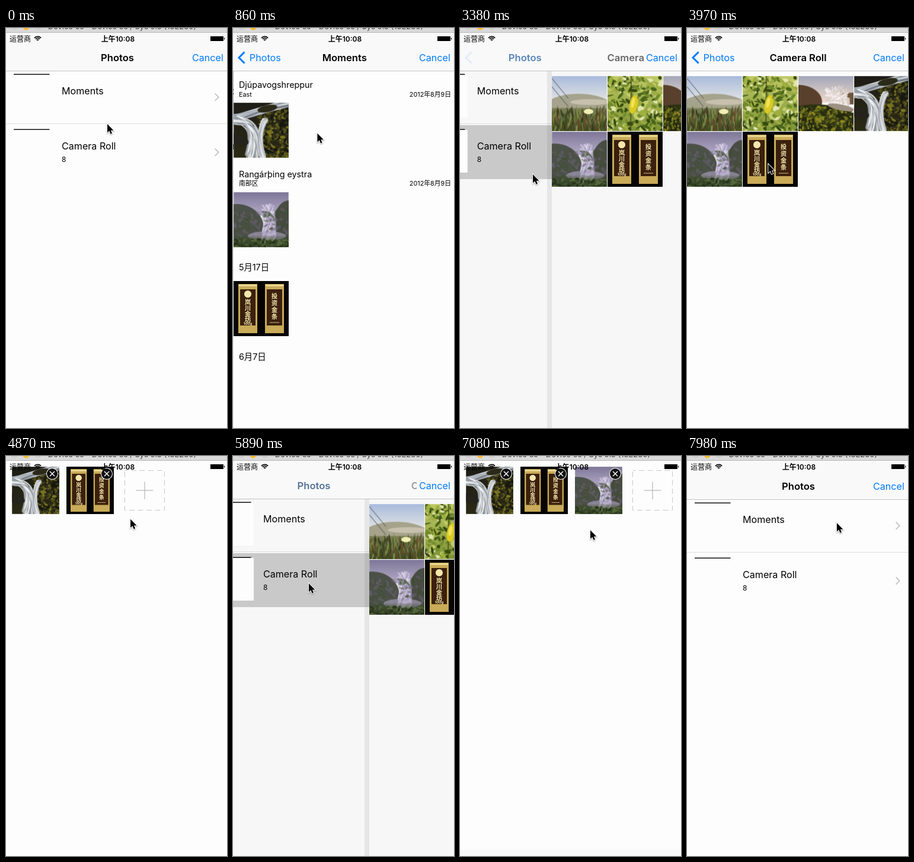
An HTML page with a canvas that plays this animation: 373 px wide and 675 px high, repeating every 8000 ms.

```html
<!DOCTYPE html>
<html lang="en">
<head>
<meta charset="utf-8">
<title>Photo picker</title>
<style>
  html, body { margin: 0; height: 100%; overflow: hidden; background: #fdfdfd; }
  canvas { display: block; width: 373px; height: 675px; }
</style>
</head>
<body>
<canvas id="stage"></canvas>
<script>
const W = 373, H = 675, LOOP = 8000, TOP = 8, TILE = 93;
const BLUE = '#007aff', PAGE = '#fdfdfd';
const FAMILY = 'Inter, "Noto Sans CJK SC", "Noto Sans CJK", sans-serif';

const stage = document.getElementById('stage');
const dpr = window.devicePixelRatio || 1;
stage.width = W * dpr;
stage.height = H * dpr;
const ctx = stage.getContext('2d');
ctx.scale(dpr, dpr);

// ---------- drawing helpers ----------
function rect(g, color, x, y, w, h) {
  g.fillStyle = color;
  g.fillRect(x, y, w, h);
}
function line(g, color, width, x1, y1, x2, y2) {
  g.strokeStyle = color;
  g.lineWidth = width;
  g.beginPath();
  g.moveTo(x1, y1);
  g.lineTo(x2, y2);
  g.stroke();
}
// Angle bracket with its tip at x, y; a negative size points left.
function chevron(color, width, x, y, size) {
  ctx.strokeStyle = color;
  ctx.lineWidth = width;
  ctx.beginPath();
  for (const side of [-1, 0, 1]) ctx.lineTo(x - Math.abs(side) * size, y + side * size);
  ctx.stroke();
}
function disc(g, color, x, y, rx, ry = rx, turn = 0) {
  g.fillStyle = color;
  g.beginPath();
  g.ellipse(x, y, rx, ry, turn, 0, 7);
  g.fill();
}
function text(g, str, x, y, size, { color = '#000', weight = 400, align = 'left' } = {}) {
  g.font = `${weight} ${size}px ${FAMILY}`;
  g.fillStyle = color;
  g.textAlign = align;
  g.fillText(str, x, y);
}
function fade(g, top, bottom, y = 0, h = TILE) {
  const shade = g.createLinearGradient(0, y, 0, y + h);
  shade.addColorStop(0, top);
  shade.addColorStop(1, bottom);
  rect(g, shade, 0, y, TILE, h);
}
function seeded(seed) {
  return () => (seed = (seed * 16807) % 2147483647) / 2147483647;
}
// Small turned specks strewn over the tile from y downwards, right of x.
function strew(g, count, x, y, colors, rx, ry, turn = 3) {
  const rnd = seeded(count);
  for (let i = 0; i < count; i++) {
    disc(g, colors[i % colors.length], x + rnd() * (TILE - x), y + rnd() * (TILE - y),
      rx * (0.5 + rnd()), ry * (0.5 + rnd()), (rnd() - 0.5) * turn);
  }
}
// Strands of falling water that share a curve.
function stream(g, colors, from, bend, to, spread) {
  const rnd = seeded(97);
  const near = ([x, y]) => [x + (rnd() - 0.5) * spread, y + (rnd() - 0.5) * spread * 0.6];
  for (let i = 0; i < 40; i++) {
    g.strokeStyle = colors[i % colors.length];
    g.lineWidth = 1 + rnd() * 2;
    g.beginPath();
    g.moveTo(...near(from));
    g.quadraticCurveTo(...near(bend), ...near(to));
    g.stroke();
  }
}

// ---------- pictures, each on a 93 x 93 tile ----------
function dunes(g) {
  fade(g, '#a9bbdc', '#dfe2e2', 0, 40);
  disc(g, '#a5a38c', 45, 58, 62, 28);
  disc(g, '#c6c0ac', 65, 44, 34, 5);
  fade(g, '#7d8159', '#3c4723', 54, 40);
  strew(g, 180, 0, 58, ['#45541f', '#7f8b45', '#6b4a2c', '#2f3a18'], 0.9, 7, 0.8);
  for (const y of [4, 18]) line(g, '#4a4b50', 0.8, 0, y, 28, y + 34);
  disc(g, '#f3efb4', 62, 60, 8, 4.5);
}
function lemon(g) {
  fade(g, '#c0c965', '#7d9236');
  strew(g, 60, 0, 0, ['#e2e6b0', '#c3cd6a', '#a0b040'], 6, 4);
  strew(g, 160, 0, 0, ['#48641a', '#718b2b', '#34490f', '#9dac45'], 5, 2);
  line(g, '#3f4a18', 1.5, 40, 0, 39, TILE);
  disc(g, '#dcc922', 44, 48, 7, 16, 0.2);
  disc(g, '#f0e456', 43, 45, 3, 9, 0.2);
}
function sunnyFalls(g) {
  fade(g, '#a3a6ba', '#f0dccb', 0, 45);
  disc(g, '#59402c', 0, 44, 40, 29);
  disc(g, '#6d5640', 93, 38, 32, 10);
  stream(g, ['#f4eeee', '#dccfca'], [66, 28], [66, 38], [66, 50], 44);
  disc(g, '#2c3112', 30, 82, 75, 34);
  strew(g, 260, 0, 53, ['#70731b', '#23280f', '#8e8922', '#454a19'], 3, 1.8);
  disc(g, '#9d9183', 72, 53, 23, 5, 0.2);
}
function closeFalls(g) {
  fade(g, '#1d1d16', '#2b2a14');
  strew(g, 260, 42, 8, ['#55531a', '#171810', '#7b7622', '#35321c'], 3, 2);
  stream(g, ['#a9b0b8', '#d3d8de', '#747b83'], [93, 0], [48, 12], [0, 26], 18);
  stream(g, ['#f2f4f6', '#c5cad0', '#8a9097'], [0, 30], [45, 30], [32, 93], 26);
  stream(g, ['#e2e5e8', '#a7adb3'], [54, 28], [38, 52], [50, 93], 8);
  disc(g, '#24241c', 6, 62, 20, 9, 0.3);
  disc(g, '#2b2918', 57, 10, 17, 6, -0.2);
}
function violetFalls(g) {
  fade(g, '#7e7799', '#b5adc6', 0, 40);
  disc(g, '#4c5148', 5, 60, 46, 40);
  disc(g, '#494c43', 93, 60, 27, 46);
  stream(g, ['#c9bfdc', '#a79bbd', '#ddd5ea'], [59, 26], [60, 45], [60, 74], 24);
  strew(g, 130, 0, 30, ['rgba(62,78,48,.5)', 'rgba(115,106,130,.4)'], 5, 2);
  disc(g, 'rgba(170,160,190,.65)', 56, 74, 32, 8);
  fade(g, 'rgba(62,76,42,.2)', '#2f3d20', 74, 19);
  strew(g, 90, 0, 80, ['#39492a', '#56693a', '#27341a'], 4, 1.5);
}
function goldBars(g) {
  rect(g, '#060504', 0, 0, TILE, TILE);
  ['岚川金坊', '投资金条'].forEach((name, i) => {
    const x = 8 + 45 * i;
    rect(g, '#c9ab58', x, 5, 32, 83);
    rect(g, '#e9d690', x + 1, 6, 30, 3);
    rect(g, '#3b200d', x + 3, 14, 26, 61);
    [...name].forEach((ch, row) => text(g, ch, x + 16, 39 - 10 * i + row * (10 + 1.5 * i), 10.5,
      { color: '#f5e6ac', weight: 800, align: 'center' }));
  });
  disc(g, '#f5e6ac', 24, 22, 6);
  text(g, '100g', 24, 74, 6, { color: '#f5e6ac', weight: 700, align: 'center' });
  line(g, '#d8c182', 1, 61, 70, 77, 70);
}
function render(paint) {
  const tile = document.createElement('canvas');
  tile.width = tile.height = TILE * 2;
  const g = tile.getContext('2d');
  g.scale(2, 2);
  if (paint !== goldBars) g.filter = 'blur(0.8px)';
  paint(g);
  return tile;
}
const ROLL = [dunes, lemon, sunnyFalls, closeFalls, violetFalls, goldBars].map(render);
const [, , , CLOSE, VIOLET, GOLD] = ROLL;
const PICKED = [CLOSE, GOLD, VIOLET];

// ---------- timeline ----------
// Each visit: the sheet opens, a row is tapped, a photo is picked and the sheet closes.
const visits = [
  { open: -3000, tap: 410, close: 1500, album: 'Moments', row: [171, 162], pick: [75, 215] },
  { open: 2640, tap: 3258.5, close: 4300, album: 'Camera Roll', row: [123, 247], pick: [141, 225] },
  { open: 5250, tap: 5801, close: 6720, album: 'Camera Roll', row: [128, 215], pick: [44, 228] },
  { open: 7411, tap: 8200, close: 9300, album: 'Moments', row: [250, 115], pick: [75, 215] },
];
const stops = visits.flatMap(({ open, tap, close, row, pick }, i) => {
  const plus = [52 + 92 * i, 62];
  return [
    { t: open - 150, at: plus }, { t: open + 50, at: plus },
    { t: open + (tap - open) * 0.75, at: row }, { t: tap + 150, at: row },
    { t: close - 110, at: pick }, { t: close + 50, at: pick },
  ];
});
function pointerAt(t) {
  const i = stops.findIndex(stop => stop.t > t);
  const a = stops[i - 1], b = stops[i];
  const u = (t - a.t) / (b.t - a.t), ease = u * u * (3 - 2 * u);
  return a.at.map((from, axis) => from + (b.at[axis] - from) * ease);
}
function spring(ms) {
  if (ms <= 0) return 0;
  const x = ms * 0.018, p = 1 - (1 + x) * Math.exp(-x);
  return p > 0.9995 ? 1 : p;
}

// ---------- screens ----------
function drawHome(count) {
  const step = 91.75;
  rect(ctx, PAGE, 0, 0, W, H);
  PICKED.slice(0, count).forEach((photo, i) => {
    const x = Math.round(10 + i * step);
    ctx.drawImage(photo, x, 18, 80, 80);
    disc(ctx, '#fff', x + 68, 30, 10);
    disc(ctx, '#111', x + 68, 30, 9);
    for (const d of [-4, 4]) line(ctx, '#fff', 1.5, x + 68 - d, 26, x + 68 + d, 34);
  });
  const x = Math.round(16 + count * step) + 0.5;
  ctx.setLineDash([9, 5.5]);
  ctx.lineDashOffset = 4;
  ctx.strokeStyle = '#c8c8c8';
  ctx.lineWidth = 1;
  ctx.strokeRect(x, 24.5, 67, 67);
  ctx.setLineDash([]);
  line(ctx, '#bcbcbc', 1.3, x + 19, 58, x + 48, 58);
  line(ctx, '#bcbcbc', 1.3, x + 33.5, 43.5, x + 33.5, 73);
}

function drawList(background, selected) {
  rect(ctx, background, 0, 0, W, H);
  ['Moments', 'Camera Roll'].forEach((name, i) => {
    const y = 71 + TILE * i;
    if (selected === name) rect(ctx, '#c9c9c9', 0, y, W, 91);
    rect(ctx, PAGE, 13, y + 8, 65, 72);
    rect(ctx, '#111', 13, y + 6.5, 60.5, 1.5);
    text(ctx, name, 94, y + 41, 16.1);
    if (i) text(ctx, '8', 94, y + 62, 12);
    chevron('#c4c4c8', 1.8, 358.8, y + 45.7, 6.2);
  });
  rect(ctx, '#dedede', 0, 161, W, 1);
}

function drawMoments() {
  const sections = [
    ['Djúpavogshreppur', 'East', CLOSE], ['Rangárþing eystra', '南部区', VIOLET],
    ['5月17日', '', GOLD], ['6月7日'],
  ];
  sections.forEach(([title, place, photo], i) => {
    const y = 101 + 150.5 * i;
    text(ctx, title, 9, place ? y : y + 7, 14.3);
    if (place) {
      text(ctx, place, 9, y + 14.5, 10.8);
      text(ctx, '2012年8月9日', 367, y + 14.5, 10.8, { align: 'right' });
    }
    if (photo) ctx.drawImage(photo, 0, Math.round(y + 25), TILE, TILE);
  });
}
function drawRoll() {
  ROLL.forEach((photo, i) =>
    ctx.drawImage(photo, (i % 4) * 94, 81 + Math.floor(i / 4) * 94, TILE, TILE));
}

function drawNav(p, album) {
  rect(ctx, '#f9f9f9', 0, TOP, W, 64);
  rect(ctx, '#c3c3c5', 0, 72, W, 1);
  ctx.globalAlpha = 1 - 1.44 * p * (1 - p);
  const weight = p < 0.9 ? 600 : 400;
  text(ctx, 'Photos', 188 - 134 * p, 56, weight === 600 ? 16.6 : 16.2,
    { color: `rgb(0,${122 * p},${255 * p})`, weight, align: 'center' });
  if (p > 0) {
    ctx.globalAlpha = Math.max(0, (p - 0.54) / 0.46);
    chevron(BLUE, 3, 10, 50, -9.5);
    ctx.globalAlpha = p;
    ctx.save();
    ctx.beginPath();
    ctx.rect(0, TOP, 310, 64);
    ctx.clip();
    text(ctx, album, 187.5 + 262 * (1 - p), 56, 16.6, { weight: 600, align: 'center' });
    ctx.restore();
  }
  ctx.globalAlpha = 1;
  text(ctx, 'Cancel', 314, 56, 16.1, { color: BLUE });
}

function drawPicker(t, visit) {
  const p = spring(t - visit.tap);
  const background = p > 0 && p < 0.95 ? '#f7f7f7' : PAGE;
  if (p < 1) {
    ctx.save();
    ctx.translate(-0.3 * W * p, 0);
    drawList(background, t > visit.tap - 100 ? visit.album : '');
    ctx.restore();
  }
  if (p > 0) {
    ctx.save();
    ctx.translate(Math.round(W * (1 - p)), 0);
    if (p < 1) rect(ctx, 'rgba(0,0,0,.07)', -8, 0, 8, H);
    rect(ctx, background, 0, 0, W, H);
    (visit.album === 'Moments' ? drawMoments : drawRoll)();
    ctx.restore();
  }
  drawNav(p, visit.album);
}

function drawStatus() {
  text(ctx, '运营商', 6, 22.5, 12);
  text(ctx, '上午10:08', 189, 22.5, 12, { weight: 600, align: 'center' });
  ctx.strokeStyle = '#000';
  ctx.lineWidth = 1.8;
  for (let r = 2; r < 8; r += 2.8) {
    ctx.beginPath();
    ctx.arc(53.5, 22, r, -Math.PI * 0.76, -Math.PI * 0.24);
    ctx.stroke();
  }
  rect(ctx, '#000', 345, 14, 22, 8);
  rect(ctx, '#000', 368, 16.5, 1.2, 3);
}
function drawWindowBar() {
  rect(ctx, '#d9d9d9', 0, 0, W, 7);
  rect(ctx, '#b5b5b5', 0, 7, W, 1);
  ['#cfcfcf', '#fdbc2e', '#cfcfcf'].forEach((color, i) => disc(ctx, color, 14 + 20 * i, -2, 5.5));
  text(ctx, 'Device 6s - Device 6s / Sys 9.3 (13E230)', 196, 2, 13, { color: '#444', align: 'center' });
}
const arrow = new Path2D('M0 0V14.5L3.4 11.5 5.6 16.7 8 15.7 5.9 10.7H10.4Z');
function drawPointer([x, y]) {
  ctx.save();
  ctx.translate(x, y);
  ctx.shadowColor = 'rgba(0,0,0,.4)';
  ctx.shadowBlur = 2 * dpr;
  ctx.shadowOffsetY = dpr;
  ctx.strokeStyle = '#fff';
  ctx.lineWidth = 2;
  ctx.stroke(arrow);
  ctx.shadowColor = 'transparent';
  ctx.fillStyle = '#000';
  ctx.fill(arrow);
  ctx.restore();
}

function draw(t) {
  const visit = visits.findLast(v => t >= v.open);
  const y = Math.round((H - TOP) * (1 - spring(t - visit.open) + spring(t - visit.close)));
  drawHome(visits.filter(v => t >= v.close).length);
  if (y < H - TOP) {
    ctx.save();
    ctx.translate(0, y);
    drawPicker(t, visit);
    ctx.restore();
  }
  drawStatus();
  drawWindowBar();
  drawPointer(pointerAt(t));
}

// The screen refreshes about seven times a second.
const TICK = 147.5, LEAD = 25;
const start = performance.now();
function frame() {
  const t = (performance.now() - start) % LOOP;
  draw(Math.max(0, Math.floor((t + LEAD) / TICK) * TICK - LEAD));
  requestAnimationFrame(frame);
}
frame();
</script>
</body>
</html>
```
